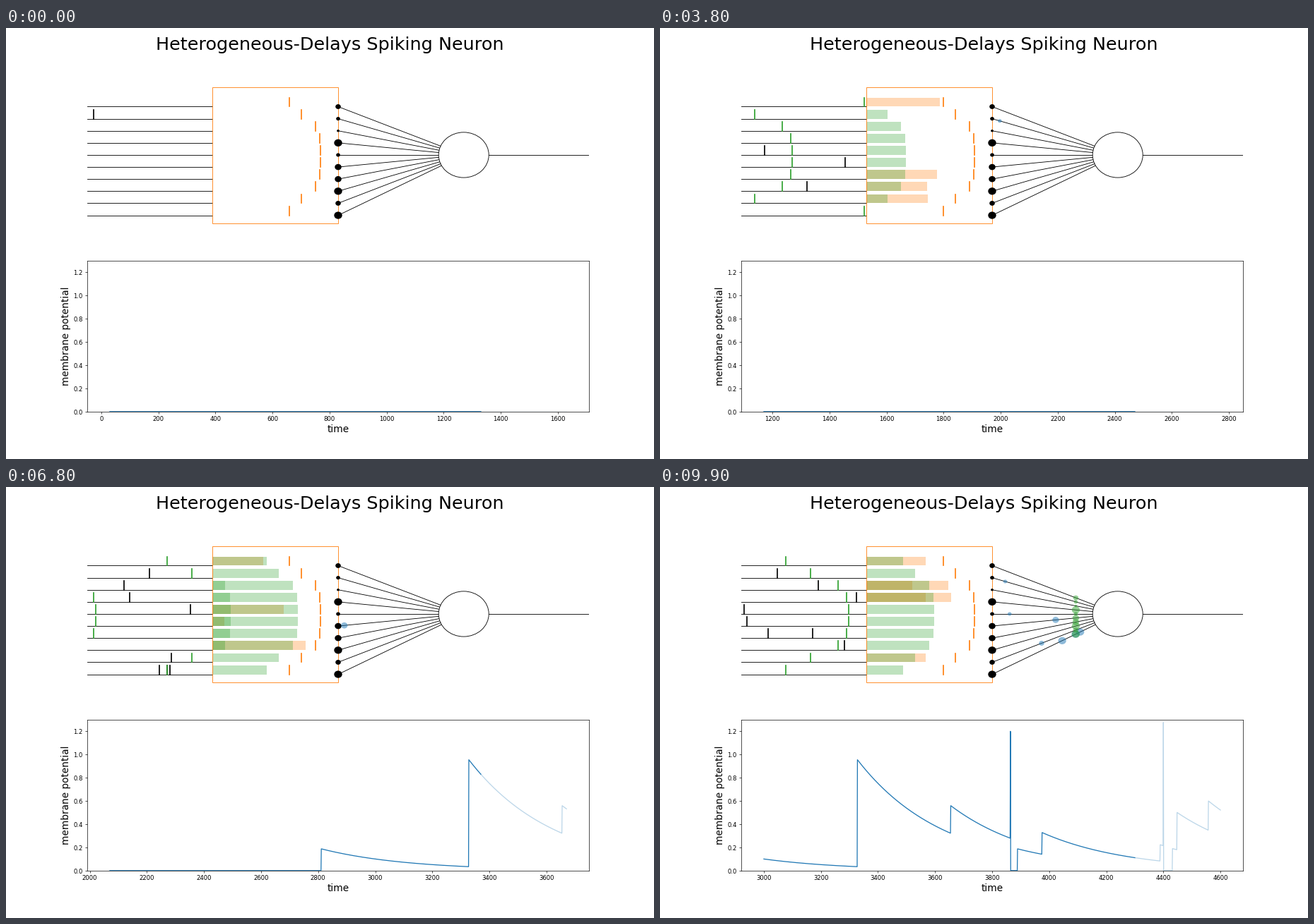
Animation of 917 by 611 pixels, one loop 10000 ms. Source, as a matplotlib script:

```python
import matplotlib.pyplot as plt
import numpy as np
from matplotlib.animation import FuncAnimation
from matplotlib.patches import Ellipse, Rectangle

ROWS, FRAMES, STEP = 10, 100, 30  # STEP: time units advanced per frame
LEFT, SECTION = -50, 440          # axon, delay box, dendrites + output
BOX, SYN, SOMA, RIGHT = (LEFT + SECTION * i for i in range(1, 5))
AXON, FLIGHT = 500, 300           # travel times along axon and dendrite
BOX_V = SECTION / 1000
ENTRY, GAP = 33, 15               # first bar length, pause before the synapse
PAST, FUTURE, NOW = 1300, 300, 1330
ORANGE, GREEN, BLUE = "tab:orange", "tab:green", "tab:blue"
ASPECT = 3.75 / 176

rows = np.arange(ROWS)
height = ROWS - 1 - rows
radius = 2.35 * np.array([4, 3, 2, 6, 3, 5, 5, 6, 4, 6])
# long delays in the middle rows, falling off as a sigmoid
offset = np.abs(rows - 4.5)
reach = 378.6 - 125 / (1 + np.exp(-1.87 * (offset - 3.42)))
delay = (reach - ENTRY) / BOX_V

# times at which background spikes enter the delay box, row by row
NOISE = [
    [632, 1710, 2574], [474, 2291, 3326], [2394, 2682, 3163],
    [2370, 2574, 3010], [1546, 2129, 3457], [1226, 2019, 3447],
    [653, 3184, 3361], [735, 1376, 3058], [726, 2204, 2574],
    [2210, 2221, 2253],
]
NOISE_KICK = {0: 0.187, 4: 0.187, 5: 0.238, 9: 0.14}
VOLLEY_KICK = 0.0921

# each spike: row, entry time, tick, bar and dot colour, kick
spikes = [(r, enter, "black", ORANGE, BLUE, NOISE_KICK.get(r, 0))
          for r in rows for enter in NOISE[r]]
# volleys whose spikes all leave the delay box together
for leave in 1698.6 + 535.75 * np.arange(5):
    spikes += [(r, leave - GAP - delay[r], GREEN, GREEN, GREEN, VOLLEY_KICK)
               for r in rows]


def simulate(n, tau=300):
    """Leaky integration of the arriving spikes, with reset above 1."""
    v, fired, kicks = np.zeros(n), [], {}
    for r, enter, *_, color, kick in spikes:
        i = int(enter + delay[r] + GAP + FLIGHT + NOW)
        kicks.setdefault(i, []).append((color, kick))
    for i in range(1, n):
        if v[i - 1] > 1:
            continue
        v[i] = v[i - 1] * np.exp(-1 / tau)
        for color, kick in kicks.get(i, []):
            stronger = color == BLUE and len(fired) > 1
            v[i] += kick * (1.35 if stronger else 1)
        if v[i] > 1:
            fired.append(i)
    return v, fired


potential, fired = simulate(FRAMES * STEP + NOW + FUTURE + 1)

fig, (net, plot) = plt.subplots(2, 1, figsize=(15, 10), dpi=61.14)
fig.suptitle("Heterogeneous-Delays Spiking Neuron", fontsize=30)


def line(x, y, color="black", lw=1, z=1):
    return net.plot(x, y, color=color, lw=lw, zorder=z)[0]


def tick(x, row, color):
    return line([x, x], [height[row], height[row] + 0.75], color, 2, 3)


def bar(row, length, color):
    return net.add_patch(Rectangle((BOX, height[row]), length, 0.75,
                                   color=color, alpha=0.3, lw=0, zorder=1.5))


def dot(x, y, r, color, alpha=1, z=3):
    return net.add_patch(Ellipse((x, y), 2 * r, 2 * r * ASPECT, color=color,
                                 alpha=alpha, lw=0, zorder=z))


net.axis("off")
for r, y in zip(rows, height):
    line([LEFT, BOX], [y, y])
    line([SYN, SOMA], [y, 5])
    dot(SYN, y, radius[r], "black")
    tick(BOX + reach[r], r, ORANGE)
line([SOMA, RIGHT], [5, 5])
net.add_patch(Rectangle((BOX, -0.65), SECTION, 11.275, fill=False,
                        ec=ORANGE, lw=1, zorder=2))
net.add_patch(Ellipse((SOMA, 5), 176, 3.75, fc="white", ec="black",
                      lw=1, zorder=2))
net.set_xlim(LEFT, RIGHT)
net.set_ylim(-1.25, 11.25)

past, = plot.plot([], [], color=BLUE)
future, = plot.plot([], [], color=BLUE, alpha=0.3)
flash = plot.axvline(0, color="darkred", lw=1, visible=False)
plot.set_ylim(0, 1.3)
plot.set_xlabel("time", fontsize=16)
plot.set_ylabel("membrane potential", fontsize=16)

moving = []


def draw_spike(t, row, enter, tick_color, bar_color, dot_color, _):
    age = t - enter
    flight = (age - delay[row] - GAP) / FLIGHT
    if -AXON <= age < 0:
        return tick(BOX + SECTION * age / AXON, row, tick_color)
    if 0 < age < delay[row]:
        return bar(row, ENTRY + BOX_V * age, bar_color)
    if 0 <= flight <= 1:
        y = height[row] + (5 - height[row]) * flight
        return dot(SYN + SECTION * flight, y, radius[row], dot_color, 0.5, 4)
    return None


def update(frame):
    t = frame * STEP
    while moving:
        moving.pop().remove()
    drawn = (draw_spike(t, *s) for s in spikes)
    moving.extend(a for a in drawn if a is not None)

    now = t + NOW
    for curve, start, stop in ((past, now - PAST, now),
                               (future, now, now + FUTURE)):
        x = np.arange(start, stop + 1)
        curve.set_data(x, potential[x])
    recent = [f for f in fired if 0 <= now - f < 90]
    flash.set_visible(bool(recent))
    if recent:
        flash.set_xdata([recent[-1]] * 2)
    plot.set_xlim(t + LEFT, t + RIGHT)
    return []


anim = FuncAnimation(fig, update, frames=FRAMES, interval=100,
                     init_func=lambda: update(0), repeat=True, repeat_delay=0)
plt.show()
```
